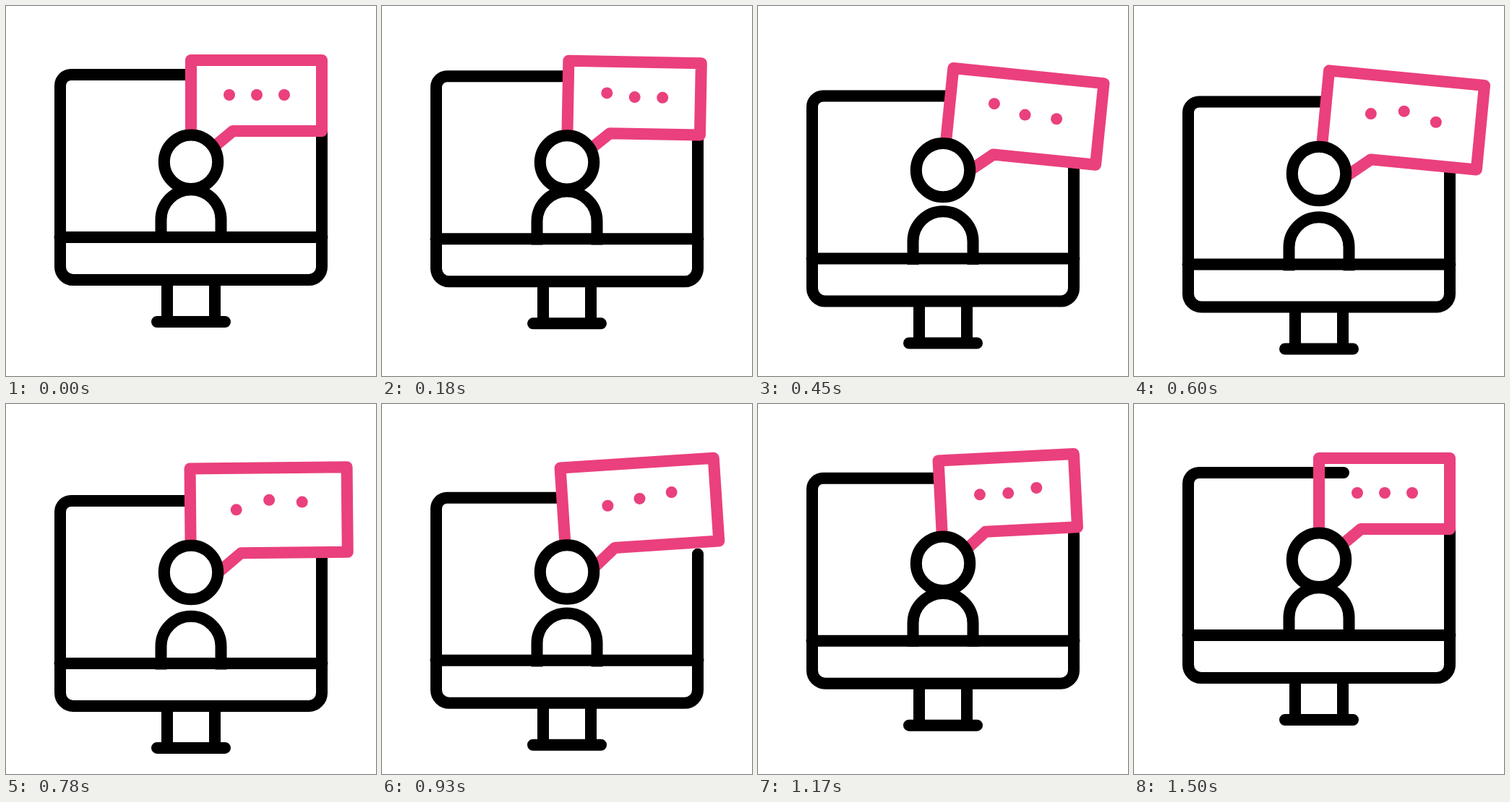
Recreate the animation shown at these times as an HTML page with a canvas. Size 512 by 512 pixels, loop 1.8 s.

```html
<!DOCTYPE html>
<html lang="en">
<head>
<meta charset="utf-8">
<title>Online conversation</title>
<style>
html, body { margin: 0; width: 100%; height: 100%; overflow: hidden; background: #fff; }
canvas { display: block; width: 100vw; height: 100vh; }
</style>
</head>
<body>
<canvas id="stage" width="512" height="512"></canvas>
<script>
const ctx = document.getElementById('stage').getContext('2d');
const LOOP = 1800, STEP = 30, REST = 1500;
const BLACK = '#000', PINK = '#ea407d', WHITE = '#fff';

const cubic = u => u < 0.5 ? 4 * u ** 3 : 1 - 4 * (1 - u) ** 3;

// Bezier easing with flat ends; x1 and x2 are the handle times.
const bezier = (x1, x2) => u => {
  let lo = 0, hi = 1;
  for (let i = 0; i < 24; i++) {
    const s = (lo + hi) / 2, r = 1 - s;
    if (3 * r * r * s * x1 + 3 * r * s * s * x2 + s ** 3 < u) lo = s; else hi = s;
  }
  return lo * lo * (3 - 2 * lo);
};
const riseEase = bezier(0.67, 0.33), fallEase = bezier(0.536, 0.231);

const ramp = (t, start, end, ease = cubic) =>
  ease(Math.min(1, Math.max(0, (t - start) / (end - start))));
const pulse = (t, peak, span) =>
  ramp(t, peak - span, peak) - ramp(t, peak, peak + span);

const sink = t => ramp(t, 0, 750, riseEase) - ramp(t, 750, 1500, fallEase);
const headSink = t => ramp(t, 30, 780) - ramp(t, 810, 1428);
const tilt = t =>
  5.8 * ramp(t, 0, 500) - 9.65 * ramp(t, 500, 1000) + 3.85 * ramp(t, 1000, 1430);

function stroke(color, trace) {
  ctx.strokeStyle = color;
  ctx.beginPath();
  trace();
  ctx.stroke();
}

function line(x1, y1, x2, y2) {
  ctx.moveTo(x1, y1);
  ctx.lineTo(x2, y2);
}

function drawMonitor(dy) {
  ctx.save();
  ctx.translate(0, dy);
  stroke(BLACK, () => {
    ctx.moveTo(290, 95);
    ctx.arcTo(75, 95, 75, 200, 15);
    ctx.arcTo(75, 379, 200, 379, 18);
    ctx.arcTo(437, 379, 437, 300, 18);
    ctx.lineTo(437, 173);
    line(74.5, 320, 437.5, 320);
    line(223, 379, 223, 437);
    line(289, 379, 289, 437);
    line(209, 437, 303, 437);
  });
  ctx.restore();
}

function drawBody(dy) {
  ctx.save();
  ctx.translate(0, dy);
  ctx.lineCap = 'butt';
  stroke(BLACK, () => {
    ctx.moveTo(214.5, 328);
    ctx.arc(256, 295.7, 41.5, Math.PI, 0);
    ctx.lineTo(297.5, 328);
  });
  ctx.restore();
}

function drawBubble(t, dy) {
  const scale = 1 + 0.2 * sink(t + (t > 0 && t < REST ? 10 : 0));
  const angle = tilt(t) * Math.PI / 180;
  const c = Math.cos(angle) * scale, s = Math.sin(angle) * scale;
  // Only positions scale; line weight and dot size stay constant.
  const place = (x, y) => [256 + x * c - y * s, 198 + dy + x * s + y * c];
  const corners = [[0, 0], [0, -123], [181, -123], [181, -25], [58, -25], [28, 0]];

  ctx.beginPath();
  corners.forEach(p => ctx.lineTo(...place(...p)));
  if (t < REST) {
    ctx.fillStyle = WHITE;
    ctx.fill();
  }
  ctx.strokeStyle = PINK;
  ctx.stroke();

  const beats = [[375, 375], [735, 400], [950, 430]];
  ctx.fillStyle = PINK;
  beats.forEach(([peak, span], i) => {
    ctx.beginPath();
    ctx.arc(...place(53 + 38 * i, -75 - 11 * pulse(t, peak, span)), 8, 0, 2 * Math.PI);
    ctx.fill();
  });
}

function drawHead(dy) {
  ctx.fillStyle = WHITE;
  stroke(BLACK, () => {
    ctx.arc(256, 215.8 + dy, 37.2, 0, 2 * Math.PI);
    ctx.fill();
  });
}

function draw(now) {
  const t = Math.floor(now % LOOP / STEP) * STEP;
  const drop = sink(t);
  ctx.fillStyle = WHITE;
  ctx.fillRect(0, 0, 512, 512);
  ctx.lineWidth = 16;
  ctx.lineCap = ctx.lineJoin = 'round';
  drawMonitor(39 * drop);
  drawBody(39.7 * drop);
  drawBubble(t, 39 * drop);
  drawHead(17.2 * headSink(t));
}

let start;
function tick(now) {
  start ??= now;
  draw(now - start);
  requestAnimationFrame(tick);
}
draw(0);
requestAnimationFrame(tick);
</script>
</body>
</html>
```
